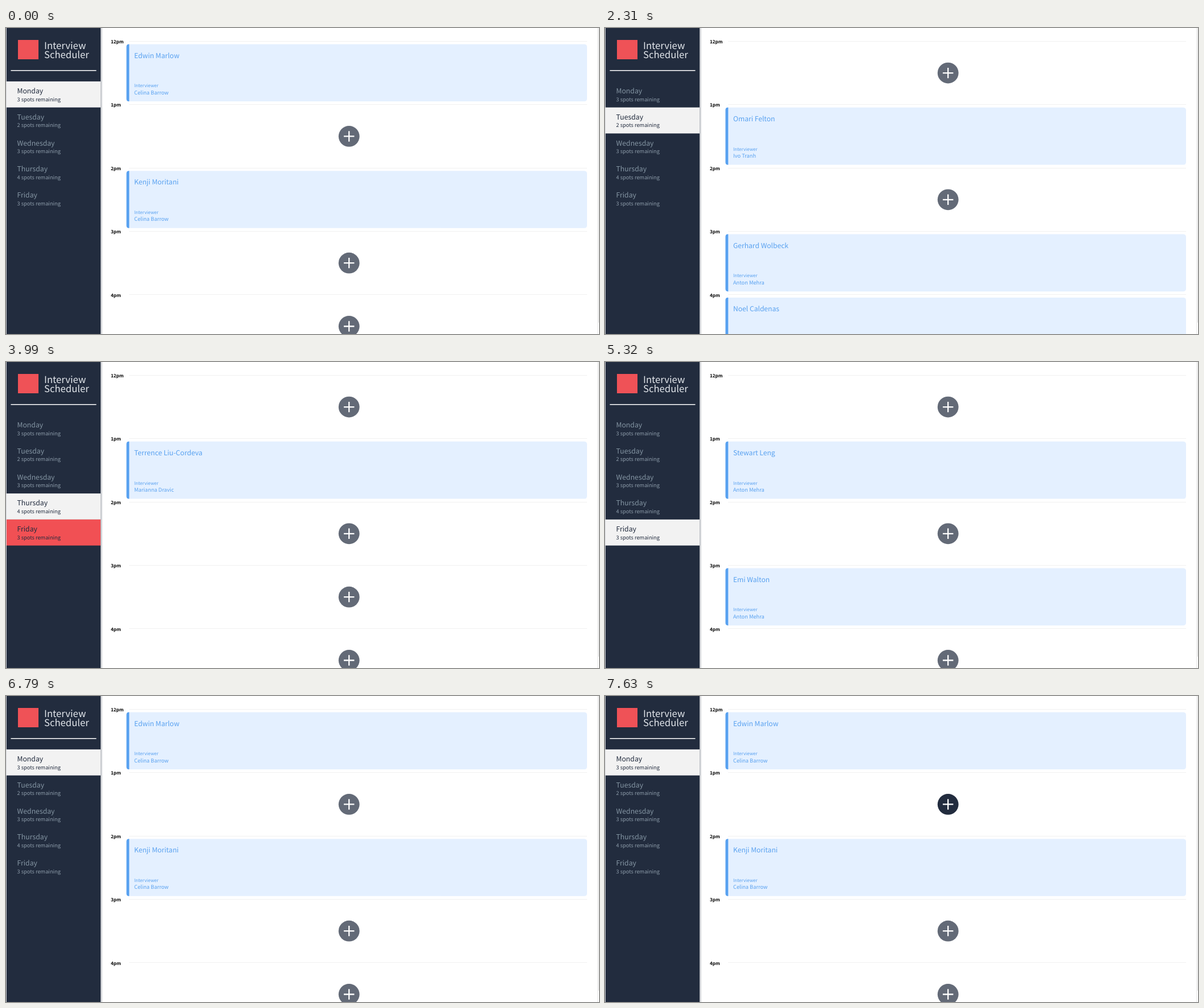
An HTML page that plays this animation: 1041x538 px, repeating every 8000 ms.

```html
<!DOCTYPE html>
<html lang="en">
<head>
<meta charset="utf-8">
<title>Interview Scheduler</title>
<style>
html, body { margin: 0; width: 100%; height: 100%; overflow: hidden; background: #fff; }
svg { display: block; width: 1041px; height: 538px; }
text {
  font-family: "Noto Sans CJK JP", "Noto Sans CJK SC", "Noto Sans CJK KR", "Noto Sans CJK", "Open Sans", sans-serif;
  text-rendering: geometricPrecision;
}
.brand { font-size: 16.7px; font-weight: 300; fill: #e3e7ec; }
.day { font-size: 12.25px; fill: #8495a3; }
.spots { font-size: 9.25px; font-weight: 300; fill: #8d9caa; }
.row rect { fill: transparent; }
.hover rect { fill: #f15054; }
.selected rect { fill: #f2f2f2; }
.hover text, .selected text { fill: #222c3e; }
.hour { font-size: 8.1px; font-weight: 700; fill: #000; }
.guest { font-size: 12.1px; font-weight: 500; fill: #58a1f0; }
.role { font-size: 8px; font-weight: 300; fill: #58a1f0; }
.host { font-size: 9.25px; font-weight: 500; fill: #58a1f0; }
</style>
</head>
<body>
<svg viewBox="0 0 1041 538">
  <defs>
    <linearGradient id="shade">
      <stop offset="0" stop-color="#222c3e" stop-opacity=".35"/>
      <stop offset="1" stop-color="#222c3e" stop-opacity="0"/>
    </linearGradient>
  </defs>
  <rect width="1041" height="538" fill="#fff"/>
  <g id="schedule"></g>
  <rect x="1038" width="1" height="538" fill="#e9e9e9"/>
  <rect x="1040" width="1" height="518" fill="#dcdcdc"/>
  <rect x="166" width="4" height="538" fill="url(#shade)"/>
  <rect width="1" height="538" fill="#d5d7da"/>
  <rect x="1" width="165" height="538" fill="#222c3e"/>
  <rect x="21" y="21" width="36" height="34" fill="#ef5257"/>
  <text class="brand" x="67" y="36.5">Interview</text>
  <text class="brand" x="67" y="53">Scheduler</text>
  <rect x="8.5" y="74" width="150" height="1.5" fill="#fff"/>
  <g id="days"></g>
</svg>
<script>
const LOOP = 8000;
const SLOT = 111.35;
const ROW = 45.75;
const HOURS = ['12pm', '1pm', '2pm', '3pm', '4pm'];
const DAYS = [['Monday', 3], ['Tuesday', 2], ['Wednesday', 3], ['Thursday', 4], ['Friday', 3]];

// Bookings per day: slot index -> [guest, interviewer]
const BOOKINGS = {
  0: { 0: ['Edwin Marlow', 'Celina Barrow'], 2: ['Kenji Moritani', 'Celina Barrow'] },
  1: { 1: ['Omari Felton', 'Ivo Tranh'], 3: ['Gerhard Wolbeck', 'Anton Mehra'], 4: ['Noel Caldenas', 'Celina Barrow'] },
  3: { 1: ['Terrence Liu-Cordeva', 'Marianna Dravic'] },
  4: { 1: ['Stewart Leng', 'Anton Mehra'], 3: ['Emi Walton', 'Anton Mehra'] }
};

// Each step changes only the properties it names.
const STEPS = [
  { at: 0, day: 0, hover: -1, card: -1, glow: 0.7 },
  { at: 1610, hover: 1 },
  { at: 2310, day: 1 },
  { at: 2590, hover: 2 },
  { at: 3080, hover: 3 },
  { at: 3640, day: 3 },
  { at: 3990, hover: 4 },
  { at: 5320, day: 4 },
  { at: 5740, hover: 3 },
  { at: 5810, hover: 2 },
  { at: 5880, hover: 1 },
  { at: 6090, hover: 0 },
  { at: 6790, day: 0 },
  { at: 7070, hover: -1, card: 0 },
  { at: 7350, card: -1 },
  { at: 7490, glow: 0.8 },
  { at: 7560, glow: 0.92 },
  { at: 7630, glow: 1 }
];

const label = (kind, x, y, content) => `<text class="${kind}" x="${x}" y="${y}">${content}</text>`;

function bookingCard(y, [guest, host], raised) {
  const edge = raised
    ? `<rect x="216.5" y="${y + 0.5}" width="804" height="100.5" rx="4.5" fill="none" stroke="#c5dcf6"/>`
    : '';
  return `<rect x="211.5" y="${y}" width="808.5" height="100.6" rx="4.5" fill="#e4f0ff"/>${edge}
    <path d="M216.3 ${y}v100.6h-.6a4.3 4.3 0 0 1-4.2-4.3v-92a4.3 4.3 0 0 1 4.2-4.3z" fill="#58a1f0"/>`
    + label('guest', 225, y + 24, guest)
    + label('role', 225, y + 75.8, 'Interviewer')
    + label('host', 225, y + 88, host);
}

function addButton(y, opacity) {
  return `<circle cx="602.2" cy="${y}" r="18.4" fill="#222c3e" opacity="${opacity}"/>
    <path d="M593 ${y}h18.4m-9.2-9.2v18.4" stroke="#fff" stroke-width="2.3"/>`;
}

function drawSchedule({ day, card, glow }) {
  return HOURS.map((hour, i) => {
    const y = 23.3 + i * SLOT;
    const booking = BOOKINGS[day][i];
    const slot = booking
      ? bookingCard(y + 5.2, booking, card === i)
      : addButton(y + 55.8, day === 0 && i === 1 ? glow : 0.7);
    return label('hour', 184, y + 3.8, hour)
      + `<rect x="216" y="${Math.floor(y)}" width="804" height="1" fill="#f1f1f1"/>` + slot;
  }).join('');
}

function drawDays({ day, hover }) {
  return DAYS.map(([name, spots], i) => {
    const y = 93.9 + i * ROW;
    const state = i === day ? 'selected' : i === hover ? 'hover' : '';
    return `<g class="row ${state}"><rect x="1" y="${y}" width="165" height="${ROW}"/>`
      + label('day', 19.5, y + 21.2, name)
      + label('spots', 19.5, y + 34.6, `${spots} spots remaining`) + '</g>';
  }).join('');
}

const schedule = document.getElementById('schedule');
const days = document.getElementById('days');
const start = performance.now();
let shown = 0;

function tick() {
  const time = (performance.now() - start) % LOOP;
  const past = STEPS.filter(step => step.at <= time);
  if (past.length !== shown) {
    const state = Object.assign({}, ...past);
    schedule.innerHTML = drawSchedule(state);
    days.innerHTML = drawDays(state);
    shown = past.length;
  }
  requestAnimationFrame(tick);
}
tick();
</script>
</body>
</html>
```
